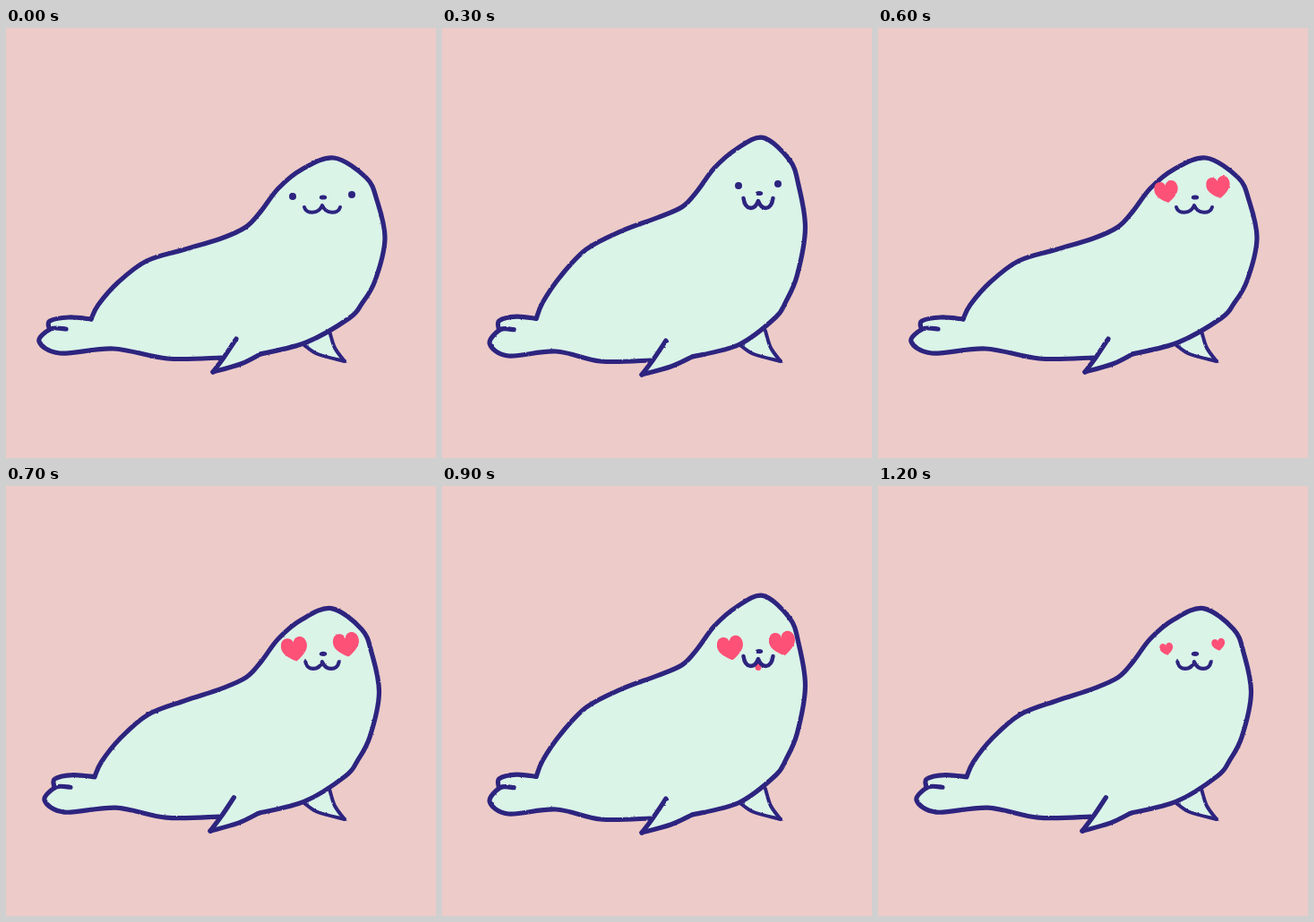
Animation of 480x480 px, one loop 1300 ms. Source, as an HTML page:

```html
<!DOCTYPE html>
<html lang="en">
<head>
<meta charset="utf-8">
<title>Seal in love</title>
<style>
  html, body { margin: 0; width: 100%; height: 100%; overflow: hidden; background: #edcbc8; }
  svg { display: block; width: 100vw; height: 100vh; }
  .fill { fill: #daf4e8; }
  .line { fill: none; stroke: #2d247f; stroke-linecap: round; stroke-linejoin: round; }
  .ink { fill: #2d247f; }
  .love { fill: #fd5177; }
</style>
</head>
<body>
<svg viewBox="0 0 480 480">
  <filter id="pencil" filterUnits="userSpaceOnUse" x="0" y="0" width="480" height="480" color-interpolation-filters="sRGB">
    <feTurbulence type="fractalNoise" baseFrequency=".25" numOctaves="2"/>
    <feDisplacementMap in="SourceGraphic" scale="1.8" xChannelSelector="R" yChannelSelector="G"/>
  </filter>
  <g id="seal" filter="url(#pencil)"></g>
</svg>
<script>
const STEP = 100, FRAMES = 13;
const HEART = 'M0 .5C-.3 .32 -.6 .08 -.5 -.24C-.42 -.54 -.06 -.5 0 -.26C.06 -.5 .42 -.54 .5 -.24C.6 .08 .3 .32 0 .5Z';

const parse = text => text.split('|').map(part =>
  part.trim().split(/\s+/).map(p => p.split(',').map(Number)));

// Key points at rest: back and head, paw, inner paw, belly and tail, tail fin.
const body = parse(`95,325 103,309 125,284 157,260 200,247 240,235 268,222 285,204 304,179 330,158
  366,145 402,167 414,192 423,235 412,282 397,308 383,324 335,351 284,364
  | 284,364 262,375 231,384 | 231,384 243,368 257,347
  | 240,368 180,369 120,358 60,363 37,350 50,336 67,336
  | 48,335 49,327 70,323 95,325`);
const farPaw = parse('333,354 348,364 378,372 | 378,372 367,357 361,338');

const clamp = v => Math.max(0, Math.min(1, v));

// Lifting pulls both ends inward, raises head and back, and slides the paw left.
function warp([x, y], lift) {
  const low = clamp((y - 260) / 80);
  const bulge = Math.exp(-(((x - 230) / 75) ** 2));
  const dx = .1 * Math.max(0, 200 - x) - .17 * Math.max(0, x - 320) - 8 * bulge * low;
  const dy = Math.min(3, .12 * (y - 330)) - 12 * bulge * (1 - low);
  return [x + dx * lift, y + dy * lift];
}

// Smooth curve through the points, without the opening move.
function curve(pts) {
  let d = '';
  for (let i = 0; i < pts.length - 1; i++) {
    const a = pts[i - 1] || pts[i], b = pts[i], c = pts[i + 1], e = pts[i + 2] || c;
    const lead = [0, 1].map(k => b[k] + (c[k] - a[k]) / 6);
    const trail = [0, 1].map(k => c[k] - (e[k] - b[k]) / 6);
    d += `C${lead} ${trail} ${c}`;
  }
  return d;
}

const line = (d, width) => `<path class="line" stroke-width="${width}" d="${d}"/>`;
const dot = (x, y, rx, ry = rx, type = 'ink') =>
  `<ellipse class="${type}" cx="${x}" cy="${y}" rx="${rx}" ry="${ry}"/>`;
const heart = (x, y, size) =>
  `<path class="love" d="${HEART}" transform="translate(${x} ${y}) rotate(-10) scale(${size})"/>`;
const outlined = (parts, width) =>
  `<path class="fill" d="M${parts.map(p => p[0] + curve(p)).join('L')}Z"/>` +
  parts.map(p => line(`M${p[0]}${curve(p)}`, width)).join('');

function mouth(lift) {
  const x = 353, half = 20 - 3.5 * lift;
  const end = 200 - 10 * lift, dip = 208 - 4 * lift, mid = 198 - 5 * lift;
  return line(`M${x - half} ${end}C${x - half + 2} ${dip} ${x - 4} ${dip} ${x} ${mid}
    C${x + 4} ${dip} ${x + half - 2} ${dip} ${x + half} ${end}`, 4 + lift / 2);
}

function eye(side, lift, size) {
  return size
    ? heart(351 + 29 * side, 180 - 2 * lift - 2.5 * side, size)
    : dot(353 + side * (33 - 11 * lift), 187 - 12 * lift - side, 4);
}

function draw(i) {
  // Two bobs; the last frame holds before settling.
  const beat = Math.min(i, 11) % 6;
  const lift = (1 - Math.abs(beat - 3) / 3) ** .9;
  // The hearts swell and shrink once, during the rest of the loop.
  const size = i > 3 ? 29 * Math.sin(Math.PI * (i - 3) / 10) ** .6 : 0;
  const tongue = size > 25 && lift > .6;
  return outlined(farPaw, 4) +
    outlined(body.map(part => part.map(p => warp(p, lift))), 5.2) +
    eye(-1, lift, size) + eye(1, lift, size) +
    (tongue ? dot(353, 204 - 2 * lift, 3.5, 4, 'love') : '') +
    dot(354, 189 - 4.5 * lift, 4.2, 2.6) + mouth(lift);
}

const seal = document.getElementById('seal');
const start = performance.now();
let shown = -1;
function tick() {
  const index = Math.floor((performance.now() - start) / STEP) % FRAMES;
  if (index !== shown) seal.innerHTML = draw(shown = index);
  requestAnimationFrame(tick);
}
tick();
</script>
</body>
</html>
```
